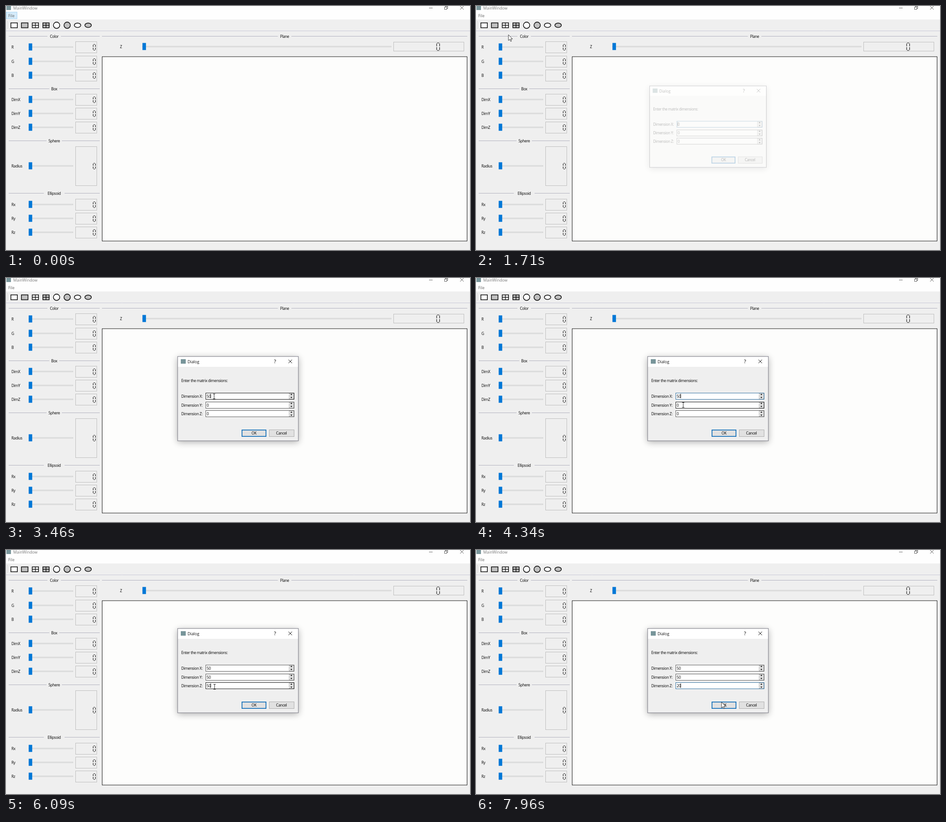
An HTML page with a canvas that plays this animation: 1030 by 544 pixels, repeating every 8 s.

```html
<!DOCTYPE html>
<html lang="en">
<head>
<meta charset="utf-8">
<style>
html, body { margin: 0; width: 100%; height: 100%; overflow: hidden; background: #f0f0f0; }
canvas { display: block; }
</style>
</head>
<body>
<canvas id="stage" width="1030" height="544"></canvas>
<script>
const ctx = document.getElementById('stage').getContext('2d');
const LOOP = 8000, OPEN = 1660, BLUE = '#0078d7', FACE = '#efefef';
const FIELD_Y = [263, 283, 302.5];

// Pointer path: time, x, y
const path = [
  [40, 8, 20], [590, 14, 23], [790, 14, 23], [1210, 72, 64], [1900, 72, 64],
  [2500, 462, 264], [3900, 462, 264], [4250, 460, 283], [5120, 460, 283],
  [5290, 458, 307], [5630, 463, 305], [7490, 463, 305], [7900, 545, 339]
];

// Focus and typing: time, field, text
const edits = [
  [OPEN, 0, '0'], [2700, 0, '0'], [2850, 0, ''], [3050, 0, '5'], [3200, 0, '50'],
  [4450, 1, '0'], [4600, 1, ''], [4800, 1, '5'], [5000, 1, '50'],
  [5480, 2, '0'], [5620, 2, ''], [5720, 2, '5'], [5800, 2, '50'],
  [7050, 2, '5'], [7140, 2, ''], [7300, 2, '2'], [7450, 2, '20']
];

function box(x, y, w, h, fill, stroke, width = 1) {
  if (fill) { ctx.fillStyle = fill; ctx.fillRect(x, y, w, h); }
  if (stroke) {
    ctx.strokeStyle = stroke;
    ctx.lineWidth = width;
    ctx.strokeRect(x + width / 2, y + width / 2, w - width, h - width);
  }
}

function lines(color, width, ...segments) {
  ctx.strokeStyle = color;
  ctx.lineWidth = width;
  ctx.beginPath();
  for (const [x1, y1, x2, y2] of segments) { ctx.moveTo(x1, y1); ctx.lineTo(x2, y2); }
  ctx.stroke();
}

function text(str, x, y, { size = 8.4, gap = -0.35, color = '#000', align = 'left' } = {}) {
  ctx.font = `${size}px "Open Sans", "Noto Sans", sans-serif`;
  ctx.letterSpacing = gap + 'px';
  ctx.textAlign = align;
  ctx.fillStyle = color;
  ctx.fillText(str, x, y);
  return ctx.measureText(str).width;
}

const caption = (str, x, y, color) => text(str, x, y, { size: 8.85, gap: 0, color });

function oval(x, y, rx, ry, fill) {
  ctx.beginPath();
  ctx.ellipse(x, y, rx, ry, 0, 0, Math.PI * 2);
  ctx.fillStyle = fill;
  ctx.fill();
  ctx.strokeStyle = '#111';
  ctx.lineWidth = 1.6;
  ctx.stroke();
}

function cross(x, y, r, color) {
  lines(color, 1, [x - r, y - r, x + r, y + r], [x + r, y - r, x - r, y + r]);
}

function group(title, x1, x2, y) {
  const mid = (x1 + x2) / 2, half = title.length * 2 + 5;
  lines('#b0b0be', 1, [x1, y + .5, mid - half, y + .5], [mid + half, y + .5, x2, y + .5]);
  text(title, mid, y + 3.5, { align: 'center' });
}

function digit(x, y, w, h) {
  const r = x + w, b = y + h, m = y + h / 2;
  lines('#181818', 1.2,
    [x + 1, y, r - 1, y], [x + 1, b, r - 1, b],
    [x, y + 1, x, m - 1], [x, m + 1, x, b - 1],
    [r, y + 1, r, m - 1], [r, m + 1, r, b - 1]);
}

function slider(x, y, length) {
  box(x, y - 1, length, 3, '#e7e9e9', '#d3d3d3');
  box(x + .4, y - 7.6, 7.8, 15.8, BLUE);
}

function lcd(x, y, w, h) {
  ctx.setLineDash([1, 1]);
  box(x, y, w, h, null, '#8c8c8c');
  ctx.setLineDash([]);
}

function row(label, y, height = 26) {
  text(label, 12, y + 4);
  slider(50, y, 99);
  lcd(154, y + 1 - height / 2, 48, height);
  digit(193.5, y - 5.5, 5, 13);
}

function toolbar() {
  box(0, 30, 1030, 25, FACE);
  lines('#c8c8d8', 1, [0, 55.5, 1030, 55.5]);
  ctx.setLineDash([1, 2]);
  lines('#aaa', 1, [3.5, 34, 3.5, 52]);
  ctx.setLineDash([]);
  ['#fff', '#c0c0c0'].forEach((fill, i) => {
    const d = i * 23.5;
    box(10 + d, 36.8, 16, 12.5, fill, '#111', 1.6);
    box(57.5 + d, 36.8, 15.5, 12.5, fill, '#111', 1.6);
    lines('#111', 1.4, [65.2 + d, 37, 65.2 + d, 49], [58 + d, 43, 73 + d, 43]);
    oval(112.3 + d, 42.9, 7, 7, fill);
    oval(158.8 + d, 42.9, 7.2, 4.8, fill);
  });
}

function mainWindow(menuLit) {
  box(0, 0, 1030, 544, FACE);
  box(0, 0, 1030, 30, '#fefefe');
  box(1, 0, 10, 9, '#78959a');
  caption('MainWindow', 16, 8, '#777');
  lines('#666', 1, [939, 4.5, 947, 4.5]);
  box(975, 0, 6, 6, null, '#666');
  box(973, 2, 6, 6, '#fefefe', '#666');
  cross(1012, 4, 4, '#666');
  if (menuLit) box(0, 13, 25, 16, '#d5ebfa', '#a9d5f2');
  caption('File', 5, 25, '#666');
  toolbar();

  group('Color', 6, 208, 67);
  row('R', 91); row('G', 123); row('B', 154);
  group('Box', 6, 208, 184);
  row('DimX', 208); row('DimY', 239); row('DimZ', 270);
  group('Sphere', 6, 208, 300);
  row('Radius', 356, 88);
  group('Ellipsoid', 6, 208, 417);
  row('Rx', 442); row('Ry', 473); row('Rz', 504);

  group('Plane', 213, 1024, 67);
  text('Z', 253, 93.5);
  slider(302.5, 90, 553);
  lcd(860, 80, 157, 21);
  digit(956, 82.5, 6.5, 16.5);
  box(213, 112.5, 811, 412, '#fdfdfc', '#111');
}

function arrows(x, y) {
  ctx.fillStyle = '#222';
  for (const s of [-1, 1]) {
    ctx.beginPath();
    ctx.moveTo(x - 2.5, y + s * 2);
    ctx.lineTo(x + 2.5, y + s * 2);
    ctx.lineTo(x, y + s * 5);
    ctx.fill();
  }
}

// The shadow is kept outside the rectangle so that it never shows through a fading window.
function shadow(x, y, w, h) {
  ctx.save();
  const outside = new Path2D();
  outside.rect(0, 0, 1030, 544);
  outside.rect(x, y, w, h);
  ctx.clip(outside, 'evenodd');
  ctx.shadowColor = 'rgba(0,0,0,.32)';
  ctx.shadowBlur = 14;
  ctx.shadowOffsetY = 3;
  box(x, y, w, h, '#000');
  ctx.restore();
}

function dialog(t, hovered) {
  const p = Math.min(1, (t - OPEN) / 200);
  const scale = .94 + .06 * (1 - (1 - p) ** 2);
  const values = ['0', '0', '0'];
  let last;
  for (const edit of edits) {
    if (edit[0] > t) break;
    values[edit[1]] = edit[2];
    last = edit;
  }

  ctx.save();
  ctx.globalAlpha = p;
  ctx.translate(515, 269);
  ctx.scale(scale, scale);
  ctx.translate(-515, -269);
  shadow(381, 175, 268, 188);
  box(381, 198, 268, 165, FACE);
  box(381, 175, 268, 23, '#fff');
  box(380.5, 174.5, 269, 189, null, '#73737f');

  box(388, 181, 11, 10, '#78959a');
  caption('Dialog', 403, 190, '#111');
  text('?', 597, 190, { size: 11, align: 'center' });
  cross(631, 186, 4, '#111');
  text('Enter the matrix dimensions:', 389, 232);

  FIELD_Y.forEach((y, i) => {
    const focused = last[1] === i;
    const border = hovered === i ? '#1c1c1c' : focused ? '#2f6f9f' : '#5c5c5c';
    text(`Dimension ${'XYZ'[i]}:`, 389, y + 3.5);
    box(443, Math.round(y - 7.5), 197, 15, '#fff', border);
    box(628, Math.round(y - 6.5), 11, 13, '#e8e8e8', '#b5b5b5');
    arrows(633.5, y);
    const width = text(values[i], 445.5, y + 3.5);
    if (focused && (t - last[0]) % 1060 < 530) {
      const x = Math.round(t < 2700 ? 445 : 445.5 + width);
      box(x, y - 5, 1, 10, '#111');
    }
  });

  box(523, 338, 55, 16, '#e1e1e1', '#0c6cb8', 1.7);
  text('OK', 550.5, 349, { align: 'center' });
  box(584, 338, 56, 16, '#e1e1e1', '#adadad');
  text('Cancel', 611.5, 349, { align: 'center' });
  ctx.restore();
}

function pointerAt(t) {
  const next = path.findIndex(k => k[0] > t);
  if (next < 0) return path[path.length - 1].slice(1);
  if (next === 0) return null;
  const [t0, x0, y0] = path[next - 1], [t1, x1, y1] = path[next];
  const p = (t - t0) / (t1 - t0), e = p * p * (3 - 2 * p);
  return [x0 + (x1 - x0) * e, y0 + (y1 - y0) * e];
}

function pointer([x, y], beam) {
  if (beam) {
    lines('#222', 1, [x - 2.5, y - 5.5, x + 2.5, y - 5.5],
      [x, y - 5.5, x, y + 5.5], [x - 2.5, y + 5.5, x + 2.5, y + 5.5]);
    return;
  }
  const shape = new Path2D('M0 0V13L3 10.3 5 15 7 14 5 9.5H9Z');
  ctx.save();
  ctx.translate(x, y);
  ctx.fillStyle = '#fff';
  ctx.fill(shape);
  ctx.strokeStyle = '#222';
  ctx.lineWidth = .9;
  ctx.stroke(shape);
  ctx.restore();
}

function draw(now) {
  const t = now % LOOP;
  const spot = pointerAt(t);
  const hovered = spot && t > OPEN && spot[0] > 443 && spot[0] < 628
    ? FIELD_Y.findIndex(y => Math.abs(spot[1] - y) < 7.5) : -1;
  mainWindow(t < 1540);
  if (t > OPEN) dialog(t, hovered);
  if (spot) pointer(spot, hovered >= 0);
  requestAnimationFrame(draw);
}
requestAnimationFrame(draw);
</script>
</body>
</html>
```
